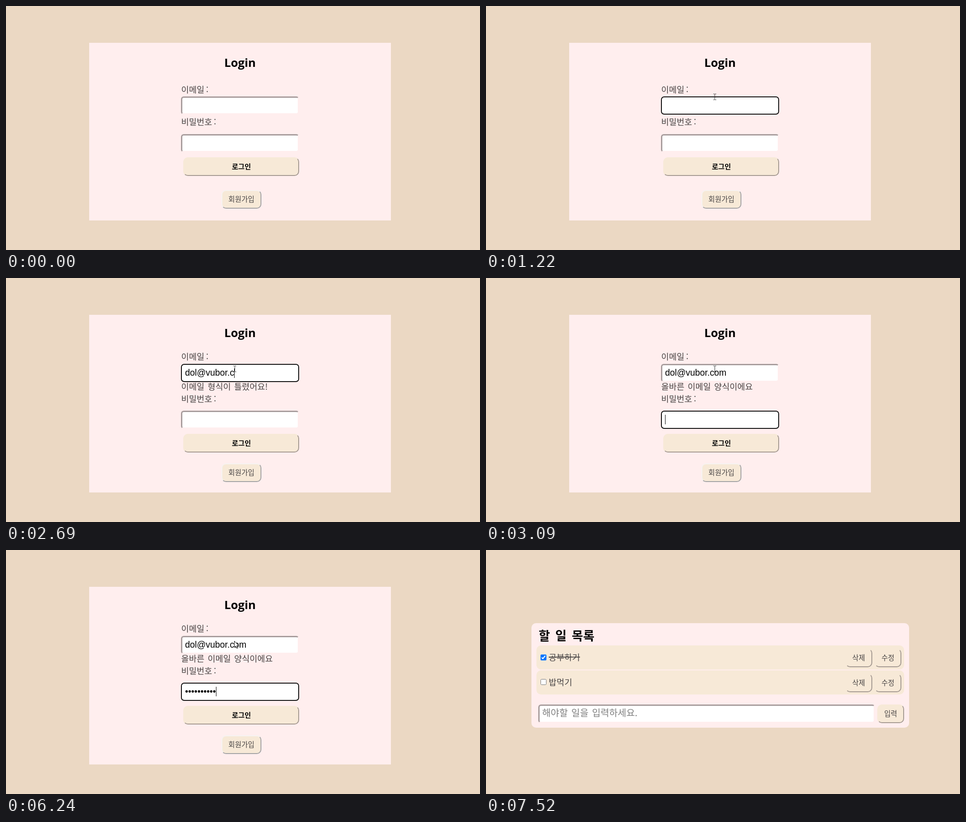
An HTML page that plays this animation: 1043x537 px, repeating every 8.05 s.

```html
<!DOCTYPE html>
<html lang="ko">
<head>
<meta charset="utf-8">
<title>Login</title>
<style>
  html, body { margin: 0; width: 100%; height: 100%; overflow: hidden; background: #ebd8c3; }
  .page, svg { position: absolute; left: 0; top: 0; width: 1043px; height: 537px; }
  .page > div, .page > input { position: absolute; box-sizing: border-box; margin: 0; }
  .shifted div, .shifted text { transform: translateY(var(--d)); }
  .panel { background: #fee; }
  .round, .item { border-radius: 10px; }
  .item { background: #f7e9d7; }
  .field { background: #fff; border: 3px solid; border-color: #a89d9d #fee #fee #a89d9d; border-radius: 6px; }
  .field.focus { border: 2px solid #101010; border-radius: 7px; }
  .btn { background: #f7e9d7; border: 2px solid; border-color: #f7e9d7 #a59a92 #a59a92 #f7e9d7; border-radius: 10px; }
  .btn.pale { border-color: #f6f3f1 #a3a3a5 #a3a3a5 #f6f3f1; }
  text { font-family: "Noto Sans CJK KR", "Noto Sans CJK", sans-serif; font-weight: 300; fill: #484444; word-spacing: 2px; white-space: pre; }
  .mid { text-anchor: middle; }
  .bold { font-weight: 700; fill: #000; }
  .latin { font-family: "Open Sans", "Noto Sans", sans-serif; }
  .typed { font-family: "Liberation Sans", Arial, sans-serif; font-weight: 400; fill: #000; }
  .label { word-spacing: -1.5px; }
  .wide { word-spacing: 4px; }
  .hint { fill: #808080; }
  .done { text-decoration: line-through #111; }
</style>
</head>
<body>
<div class="page" id="login"></div>
<div class="page" id="todo"></div>
<svg>
  <rect id="caret" width="1" height="21"/>
  <path id="arrow" d="M.5.5V14.5L3.7 11.5 6 16.5 8.2 15.5 6 10.6H10.2Z" fill="#fff" stroke="#000"/>
  <path id="beam" d="M-2 -6.5H.5M1.5 -6.5H4M1 -6V6M-2 6.5H.5M1.5 6.5H4" fill="none" stroke="#333"/>
</svg>
<script>
const $ = id => document.getElementById(id);

// d is the vertical shift once the validation message is showing
const box = (cls, x, y, w, h, d = 0, id = '') =>
  `<div id="${id}" class="${cls}" style="left:${x}px;top:${y}px;width:${w}px;height:${h}px;--d:${d}px"></div>`;
const text = (str, x, y, size, cls = '', d = 0, id = '') =>
  `<text id="${id}" class="${cls}" x="${x}" y="${y}" font-size="${size}" style="--d:${d}px">${str}</text>`;
const check = (y, on) =>
  `<input type="checkbox" tabindex="-1" ${on} style="left:120px;top:${y}px;width:13px;height:13px">`;
const fill = (id, shapes, texts) =>
  $(id).innerHTML = shapes.join('') + `<svg>${texts.join('')}</svg>`;

fill('login', [
  box('panel', 183, 81, 664, 391),
  box('field', 385, 199, 260, 40, -10, 'emailBox'),
  box('field', 385, 282, 260, 40, 10, 'passBox'),
  box('btn', 390, 333, 255, 41, 10),
  box('btn pale', 474, 405, 88, 41, 3)
], [
  text('Login', 515, 133.5, 25.6, 'mid bold latin', -3.5),
  text('이메일 :', 385.5, 190.5, 18.5, 'label', -10.5),
  text('', 394, 225, 19.4, 'typed', -10, 'email'),
  text('', 385.5, 246, 18.5, '', 0, 'note'),
  text('비밀번호 :', 385.5, 262, 18.5, 'label', 11),
  text('', 394, 308, 19.4, 'typed', 10, 'pass'),
  text('로그인', 518, 359, 15.2, 'mid bold', 10),
  text('회원가입', 518, 431, 15.6, 'mid', 3)
]);

const rows = [0, 55];
fill('todo', [
  box('panel round', 99.5, 161, 831, 230),
  ...rows.map(y => box('item', 111, 210 + y, 809, 53)
    + box('btn', 791, 217 + y, 59, 40.5) + box('btn', 855, 217 + y, 59, 40.5)),
  check(230, 'checked'), check(284, ''),
  box('field', 115, 340, 741, 41),
  box('btn', 861, 340, 59, 41)
], [
  text('할 일 목록', 116, 198.5, 27, 'bold wide'),
  text('공부하기', 138, 243, 18.7, 'done'),
  text('밥먹기', 138, 298, 18.7),
  ...rows.map(y => text('삭제', 820, 243 + y, 15.4, 'mid') + text('수정', 884.5, 243 + y, 15.4, 'mid')),
  text('해야할 일을 입력하세요.', 123.5, 366, 20.5, 'hint'),
  text('입력', 890.5, 366, 15.4, 'mid')
]);

const LOOP = 8050, FOCUS = 745, TAB = 3090, ENTER = 6170, OPEN = 6370, LEAVE = 6970, GONE = 7520;
const address = 'dol@vubor.com';
const emailKeys = [1410, 1480, 1550, 2020, 2090, 2220, 2290, 2420, 2490, 2620, 2690, 2820, 2950];
const passKeys = [3550, 3620, 3890, 3960, 4160, 4360, 4580, 4650, 4980, 5110];
const typed = (keys, t) => keys.filter(k => k <= t).length;
const show = (el, on) => el.style.display = on ? '' : 'none';
const mix = (a, b, p) => a.map((v, i) => Math.round(v + (b[i] - v) * p));
const rest = [502, 200];

function pointer(t) {
  if (t < LEAVE) {
    const p = Math.min(1, Math.floor((t - 70) / 75) / 9);
    return mix([784, 463], rest, 1 - (1 - p) ** 2);
  }
  const p = (Math.floor((t - LEAVE) / 78.5) + 1) / 7;
  return mix(rest, [952, 526], p ** 1.5);
}

function overField(t, x, y) {
  if (t >= OPEN) return x > 115 && x < 856 && y > 340 && y < 381;
  if (t >= ENTER) return false;
  return t >= FOCUS || x > 385 && x < 645 && (y >= 199 && y < 239 || y > 282 && y < 322);
}

function draw(now) {
  const t = now % LOOP;
  const n = typed(emailKeys, t), inPass = t >= TAB;
  show($('login'), t < OPEN);
  show($('todo'), t >= OPEN);

  $('login').classList.toggle('shifted', n > 0);
  $('email').textContent = address.slice(0, n);
  $('pass').textContent = '•'.repeat(typed(passKeys, t));
  $('note').textContent = !n ? '' : n < 12 ? '이메일 형식이 틀렸어요!' : '올바른 이메일 양식이에요';
  $('emailBox').classList.toggle('focus', t >= FOCUS && !inPass);
  $('passBox').classList.toggle('focus', inPass);

  const caret = $('caret');
  show(caret, t >= FOCUS && t < OPEN && !(t >= 1220 && t < 1410));
  if (t < OPEN) {
    const line = inPass ? $('pass') : $('email');
    const width = line.textContent ? line.getComputedTextLength() : 0;
    caret.setAttribute('x', Math.round(394 + width));
    caret.setAttribute('y', inPass ? 301 : n ? 199 : 209);
  }

  const [x, y] = pointer(t), beam = overField(t, x, y), visible = t >= 70 && t < GONE;
  show($('beam'), visible && beam);
  show($('arrow'), visible && !beam);
  $('beam').setAttribute('transform', `translate(${x + .5} ${y})`);
  $('arrow').setAttribute('transform', `translate(${x} ${y})`);
  requestAnimationFrame(draw);
}
draw(performance.now());
</script>
</body>
</html>
```
